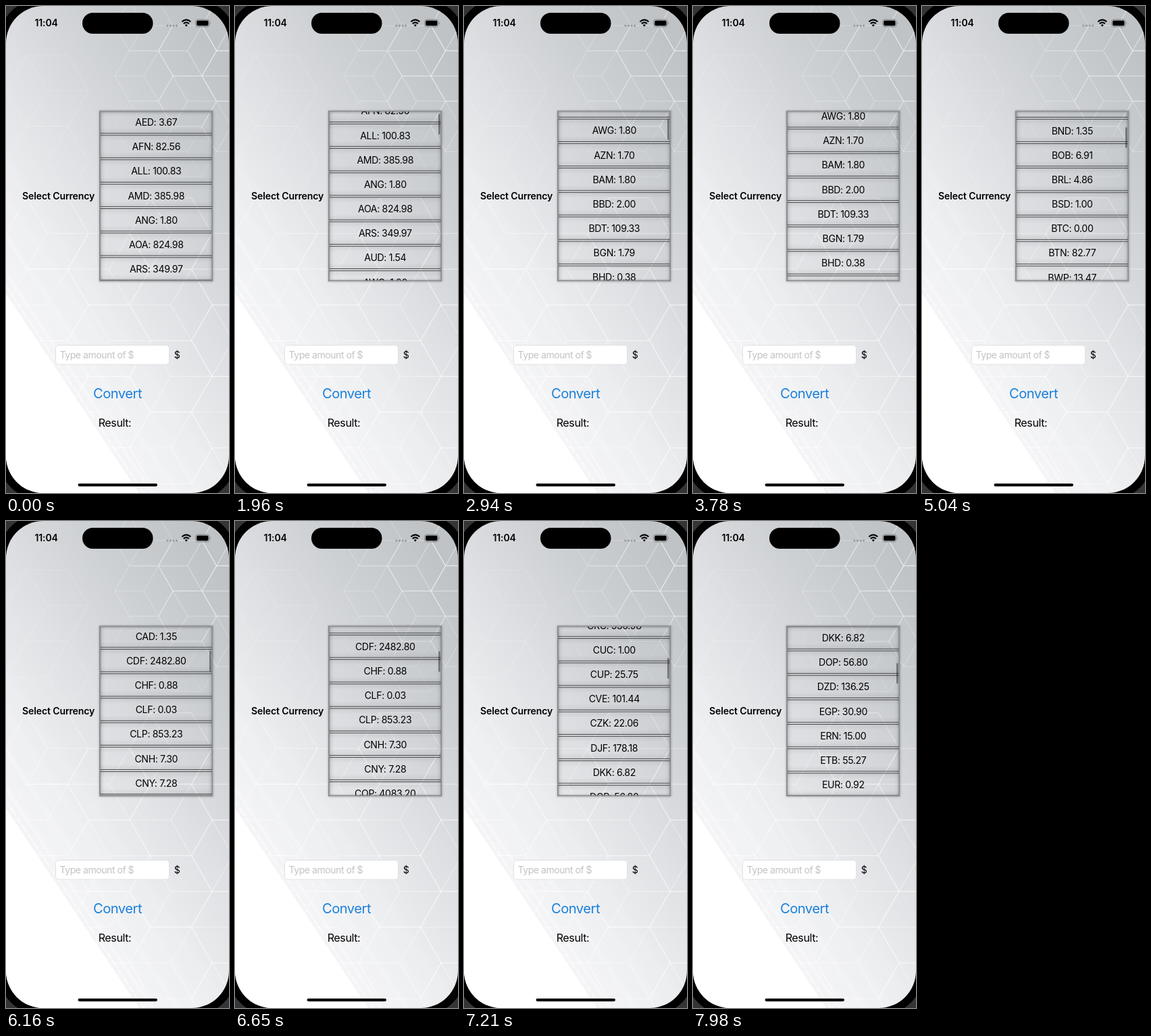
An HTML page for the animation above (8000 ms loop, 330 by 720 pixels).

```html
<!DOCTYPE html>
<html lang="en">
<head>
<meta charset="utf-8">
<title>Currency converter</title>
<style>
  html, body { margin: 0; width: 100%; height: 100%; overflow: hidden; background: #000; }
  svg { display: block; width: 330px; height: 720px; }
  text { font-family: Inter, "Liberation Sans", sans-serif; font-size: 14.1px; letter-spacing: -.025em; }
  .mid { text-anchor: middle; }
  .bold { font-weight: 600; letter-spacing: -.011em; }
</style>
</head>
<body>
<svg viewBox="0 0 330 720" xmlns="http://www.w3.org/2000/svg">
  <defs>
    <linearGradient id="sky" gradientUnits="userSpaceOnUse" x1="270" y1="0" x2="-152" y2="292">
      <stop offset="0" stop-color="#bfc3c6"/>
      <stop offset=".25" stop-color="#cdd0d3"/>
      <stop offset=".5" stop-color="#dee0e3"/>
      <stop offset=".75" stop-color="#eeeff1"/>
      <stop offset="1" stop-color="#f8f8fa"/>
    </linearGradient>
    <linearGradient id="shade" x2="0" y2="1">
      <stop offset="0" stop-opacity=".08"/>
      <stop offset=".25" stop-opacity=".015"/>
      <stop offset=".75" stop-opacity=".015"/>
      <stop offset="1" stop-opacity=".08"/>
    </linearGradient>
    <linearGradient id="sides">
      <stop offset="0" stop-opacity=".08"/>
      <stop offset=".05" stop-opacity="0"/>
      <stop offset=".95" stop-opacity="0"/>
      <stop offset="1" stop-opacity=".08"/>
    </linearGradient>
    <filter id="soft" x="-10%" y="-10%" width="120%" height="120%"><feGaussianBlur stdDeviation="1.6"/></filter>
    <clipPath id="screen"><rect width="330" height="720" rx="55"/></clipPath>
    <clipPath id="list"><rect x="138.5" y="155" width="167.5" height="252"/></clipPath>
  </defs>

  <rect width="330" height="720" fill="#333537"/>
  <rect x="-11" y="-11" width="352" height="742" rx="64"/>
  <g clip-path="url(#screen)">
    <rect width="330" height="720" fill="url(#sky)"/>
    <g id="bands" stroke="#fff" fill="none"></g>
    <g id="mesh" stroke="#fff" fill="none" stroke-linejoin="round"></g>
    <path d="M0 425 L197 720 H0Z" fill="#fff"/>
    <path d="M0 414 L204 720" stroke="#fff" stroke-opacity=".7" stroke-width="2" stroke-dasharray="9 3 14 4"/>
  </g>

  <rect x="113" y="10" width="104.5" height="31" rx="15.5"/>
  <text class="bold" x="42.5" y="30.4">11:04</text>
  <g id="dots" fill="#96999d"></g>
  <g fill="none" stroke="#000" stroke-width="2.1">
    <path d="M260.3 23.2 Q266.8 17.4 273.3 23.2"/>
    <path d="M262.8 26.1 Q266.8 22.5 270.8 26.1"/>
  </g>
  <path d="M264.7 28.2 Q266.8 26.4 268.9 28.2 L266.8 30.5Z"/>
  <rect x="280.5" y="20" width="20.5" height="10.8" rx="3.4" fill="none" stroke="#797c80" stroke-width=".9"/>
  <rect x="282" y="21.5" width="17.5" height="7.8" rx="2.1"/>
  <path d="M302.2 23.6 q1.7 1.8 0 3.6Z" fill="#797c80"/>

  <text class="bold" x="24" y="286">Select Currency</text>

  <rect x="139" y="156" width="166.5" height="250.5" fill="none" stroke="#000" stroke-opacity=".28" stroke-width="2.4" filter="url(#soft)"/>
  <g clip-path="url(#list)">
    <g id="rows"></g>
    <rect x="139" y="155" width="167" height="252" fill="url(#sides)"/>
  </g>
  <rect x="139" y="155.5" width="166.3" height="250.6" fill="none" stroke="#8b8d90" stroke-width="1.5"/>
  <rect id="bar" x="301" width="2.5" height="30.5" rx="1.25" fill="#000" fill-opacity=".4"/>

  <rect x="73.5" y="501.5" width="168" height="28.5" rx="4.5" fill="#fff" stroke="#dddee0" stroke-width=".9"/>
  <text x="79.5" y="521.2" fill="#c3c3c6" style="letter-spacing:-.035em">Type amount of $</text>
  <text x="248.7" y="521.2">$</text>
  <text class="mid" x="165" y="579.6" fill="#1a80dc" style="font-size:20.2px">Convert</text>
  <text class="mid" x="161" y="622" style="font-size:16.1px">Result:</text>
  <rect x="106.5" y="706" width="117.5" height="4.2" rx="2.1"/>
</svg>
<script>
const LOOP = 8000, TICK = 70, PITCH = 36.17, FIRST = 172, GLIDE = 455;
const byId = id => document.getElementById(id);
const clamp = (x, lo, hi) => Math.min(hi, Math.max(lo, x));

function add(parent, tag, attrs, text) {
  const el = document.createElementNS('http://www.w3.org/2000/svg', tag);
  for (const k in attrs) el.setAttribute(k, attrs[k]);
  if (text) el.textContent = text;
  byId(parent).append(el);
}

// Text of the list
const rates = `AED: 3.67, AFN: 82.56, ALL: 100.83, AMD: 385.98, ANG: 1.80, AOA: 824.98, ARS: 349.97,
AUD: 1.54, AWG: 1.80, AZN: 1.70, BAM: 1.80, BBD: 2.00, BDT: 109.33, BGN: 1.79, BHD: 0.38,
BIF: 2834.50, BMD: 1.00, BND: 1.35, BOB: 6.91, BRL: 4.86, BSD: 1.00, BTC: 0.00, BTN: 82.77,
BWP: 13.47, BYN: 2.52, BZD: 2.02, CAD: 1.35, CDF: 2482.80, CHF: 0.88, CLF: 0.03, CLP: 853.23,
CNH: 7.30, CNY: 7.28, COP: 4083.20, CRC: 536.98, CUC: 1.00, CUP: 25.75, CVE: 101.44, CZK: 22.06,
DJF: 178.18, DKK: 6.82, DOP: 56.80, DZD: 136.25, EGP: 30.90, ERN: 15.00, ETB: 55.27, EUR: 0.92,
FJD: 2.25`.split(/,\s+/);

rates.forEach((rate, i) => {
  const y = FIRST + i * PITCH;
  add('rows', 'rect', {
    x: 138.5, y: y - PITCH / 2 + .9, width: 167.5, height: PITCH - 2.8,
    fill: 'url(#shade)', stroke: '#424446', 'stroke-width': 1
  });
  add('rows', 'text', { x: 222.3, y: y + 5.1, class: 'mid' }, rate);
});

for (let i = 0; i < 4; i++) add('dots', 'circle', { cx: 238.8 + i * 4.6, cy: 29, r: 1.6 });

// Faint stripes parallel to the white corner
for (let i = 0; i < 4; i++) {
  const y = 365 - i * 55;
  add('bands', 'path', {
    d: `M-20 ${y} L340 ${y + 540}`, 'stroke-width': 5 + i * 3, 'stroke-opacity': .25 / (i + 1)
  });
}

// Hexagon with three spokes, like the outline of a cube
function cube(cx, cy, r, alpha, turn) {
  const at = k => {
    const a = k * Math.PI / 3;
    return `${(cx + r * Math.cos(a)).toFixed(1)} ${(cy + r * Math.sin(a)).toFixed(1)}`;
  };
  let d = 'M' + [0, 1, 2, 3, 4, 5].map(at).join('L') + 'Z';
  for (let k = turn; k < 6; k += 2) d += `M${cx} ${cy}L${at(k)}`;
  add('mesh', 'path', { d, 'stroke-width': 1.1, 'stroke-opacity': alpha });
}

// Honeycomb of cubes grown from one centre; alphaAt decides where it shows
function honeycomb(x0, y0, r, cols, rows, alphaAt) {
  for (let c = 0; c < cols; c++) for (let n = 0; n < rows; n++) {
    const x = x0 + c * 1.5 * r, y = y0 + (n + c % 2 / 2) * Math.sqrt(3) * r;
    const alpha = alphaAt(x, y);
    if (alpha > .05) cube(x, y, r, alpha, (c + n) % 2);
  }
}
honeycomb(204, 29, 43, 3, 3, (x, y) => .55 - Math.hypot(330 - x, 60 - y) / 420);
honeycomb(61, 125, 61, 4, 6, (x, y) => y < 300 ? (x < 130 ? .16 : 0) : .4);

// Swipes: touch, release, stop, speed in px/ms
const swipes = [
  [1050, 1260, 1260, .124],
  [1890, 2175, 3430, .383],
  [4620, 5098, 6790, .7238],
  [6860, 6880, LOOP, 1.105]
];

// Steady drag until release, then the speed decays
function scrollAt(t) {
  return swipes.reduce((pos, [touch, release, stop, speed]) => {
    const now = clamp(t, touch, stop);
    const drag = Math.min(now, release) - touch;
    const glide = GLIDE * (1 - Math.exp(-Math.max(0, now - release) / GLIDE));
    return pos + speed * (drag + glide);
  }, 0);
}

function barAlpha(t) {
  if (t < 1120) return 0;
  return t < 4690 ? clamp((3850 - t) / 350, 0, 1) : 1;
}

const origin = performance.now();
function draw() {
  const t = Math.floor((performance.now() - origin) % LOOP / TICK) * TICK;
  const pos = scrollAt(t);
  byId('rows').setAttribute('transform', `translate(0 ${-pos.toFixed(2)})`);
  byId('bar').setAttribute('y', 157.5 + pos * .0363);
  byId('bar').setAttribute('opacity', barAlpha(t));
  requestAnimationFrame(draw);
}
draw();
</script>
</body>
</html>
```
